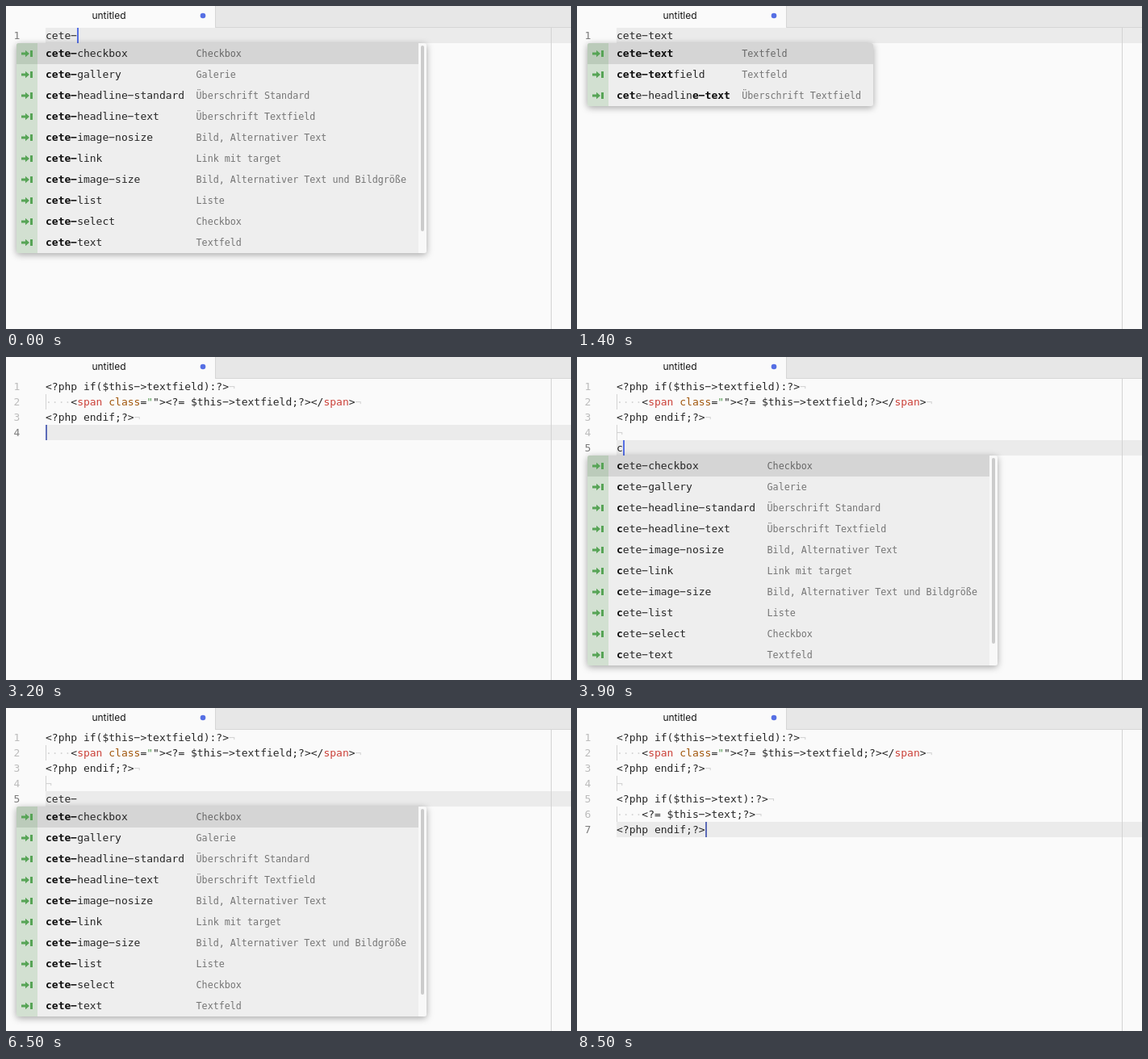
Recreate the animation shown at these times as an HTML page. Size 700x400 px, loop 8.7 s.

```html
<!DOCTYPE html>
<html lang="de">
<head>
<meta charset="utf-8">
<title>Snippet autocomplete</title>
<style>
  html, body { margin: 0; width: 100%; height: 100%; overflow: hidden; background: #fafafa; }
  svg { display: block; width: 100vw; height: 100vh; }
  text { white-space: pre; font: 13px "DejaVu Sans Mono", monospace; fill: #262626; }
  .title { font: 12px Inter, sans-serif; fill: #151515; text-anchor: middle; }
  .num { fill: #bcbcbc; }
  .num.on { fill: #7c7c7c; }
  .inv { fill: #d3d3d3; }
  .tag { fill: #cb4139; }
  .attr { fill: #a1570c; }
  .str { fill: #559a54; }
  .hit { font-weight: bold; fill: #0c0c0c; }
  .desc { font-size: 11.7px; fill: #757575; }
  .desc.on { fill: #686868; }
  .shadow { filter: drop-shadow(0 2px 4px rgba(0, 0, 0, .34)); }
</style>
</head>
<body>
<svg viewBox="0 0 700 400">
  <rect width="700" height="400" fill="#fafafa"/>
  <g id="lines"></g>
  <rect x="675" y="27" width="1" height="373" fill="#d3d3d3"/>
  <rect x="259" width="441" height="27" fill="#d6d6d6"/>
  <rect x="260" width="440" height="26" fill="#e7e7e7"/>
  <text class="title" x="127.5" y="16">untitled</text>
  <circle cx="244" cy="12" r="3.3" fill="#566fe4"/>
  <g id="popup"></g>
</svg>
<script>
const LOOP = 8700;
const LEFT = 49, TOP = 27, LINE_H = 19, CHAR_W = 7.826;
const ROW_H = 26, DESC_W = 7.044, BOX_X = 13;

// Popup entries: asterisks enclose the matched letters
const ALL = [
  ["checkbox", "Checkbox"],
  ["gallery", "Galerie"],
  ["headline-standard", "Überschrift Standard"],
  ["headline-text", "Überschrift Textfield"],
  ["image-nosize", "Bild, Alternativer Text"],
  ["link", "Link mit target"],
  ["image-size", "Bild, Alternativer Text und Bildgröße"],
  ["list", "Liste"],
  ["select", "Checkbox"],
  ["text", "Textfeld"]
];
const all = prefix => ALL.map(([name, desc]) => [prefix + name, desc]);
const some = (...names) => {
  const descs = ["Textfeld", "Textfeld", "Überschrift Textfield", "Content Element", "Module"];
  return names.map((name, i) => [name, descs[i]]);
};
const POPUPS = {
  "c": all("*c*ete-"),
  "ce": all("*ce*te-"),
  "ce-": all("*ce*te*-*"),
  "cet": all("*cet*e-"),
  "cete": all("*cete*-"),
  "cete-": all("*cete-*"),
  "cete-t": some("*cete-t*ext", "*cete-t*extfield", "*cete-*headline-*t*ext",
    "*cete-*s*t*andard-contentelement", "*cete-*s*t*andard-module"),
  "cete-te": some("*cete-te*xt", "*cete-te*xtfield", "*cete-*headline-*te*xt",
    "*cete-*standard-con*te*ntelement", "*cete-*s*t*andard-modul*e*"),
  "cete-tex": some("*cete-tex*t", "*cete-tex*tfield", "*cete-*headline-*tex*t"),
  "cete-text": some("*cete-text*", "*cete-text*field", "*cet*e-headlin*e-text*")
};

// Code lines: lists of [text, class]
const INDENT = ["····", "inv"];
const open = name => [[`<?php if($this->${name}):?>`]];
const close = [["<?php endif;?>"]];
const first = [
  open("textfield"),
  [INDENT, ["<"], ["span", "tag"], [" "], ["class", "attr"], ["="], ['"', "str"],
    ['"><?= $this->textfield;?></'], ["span", "tag"], [">"]],
  close
];
const second = [open("text"), [INDENT, ["<?= $this->text;?>"]], close];
const alone = word => [[[word]]];
const below = word => [...first, [], [[word]]];

// Each step: time, lines, popup, optional caret [row, column]
const STEPS = [
  [0, alone("cete-"), "cete-"],
  [100, alone("cete-t"), "cete-"],
  [200, alone("cete-t"), "cete-t"],
  [300, alone("cete-te"), "cete-t"],
  [400, alone("cete-te"), "cete-te"],
  [500, alone("cete-tex"), "cete-te"],
  [600, alone("cete-tex"), "cete-tex"],
  [700, alone("cete-text"), "cete-tex"],
  [800, alone("cete-text"), "cete-text"],
  [2000, first, "", [1, 17]],
  [2400, first, ""],
  [3200, [...first, []], ""],
  [3500, below(""), ""],
  [3800, below("c"), ""],
  [3900, below("c"), "c"],
  [4000, below("ce"), "c"],
  [4100, below("ce"), "ce"],
  [4500, below("ce-"), "ce"],
  [4600, below("ce-"), "ce-"],
  [5300, below("ce"), "ce"],
  [5500, below("cet"), "ce"],
  [5600, below("cete"), "cet"],
  [5700, below("cete-"), "cete"],
  [5800, below("cete-"), "cete-"],
  [6600, below("cete-t"), "cete-"],
  [6700, below("cete-te"), "cete-t"],
  [6800, below("cete-te"), "cete-te"],
  [8400, [...first, [], ...second], ""]
];
const CARET_OFF = [[1400, 1900], [5100, 5300], [6400, 6600], [7200, 7600], [8000, 8400]];

const byId = id => document.getElementById(id);
// Hyphens are drawn wide, as in the editor's face
const esc = s => s.replace(/&/g, "&amp;").replace(/</g, "&lt;").replace(/-/g, "−");
const span = (s, cls) => `<tspan class="${cls || ""}">${esc(s)}</tspan>`;
const rect = (x, y, w, h, fill, more = "") =>
  `<rect x="${x}" y="${y}" width="${w}" height="${h}" fill="${fill}" ${more}/>`;
const lineLength = line => line.reduce((n, [s]) => n + s.length, 0);

function drawLines(lines, caret, caretOn, hasPopup) {
  const last = lines.length - 1;
  const [row, col] = caret || [last, lineLength(lines[last])];
  let out = rect(LEFT, TOP + row * LINE_H, 700 - LEFT, LINE_H, "#ebebeb");
  lines.forEach((line, i) => {
    const y = TOP + i * LINE_H;
    const guide = line[0] === INDENT || (!line.length && i < last);
    if (guide) out += rect(LEFT, y, 1, LINE_H, "#d3d3d3");
    out += `<text class="num ${i === row ? "on" : ""}" x="9.5" y="${y + 14}">${i + 1}</text>`;
    const eol = i < last ? span("¬", "inv") : "";
    out += `<text x="${LEFT}" y="${y + 14}">${line.map(t => span(...t)).join("")}${eol}</text>`;
  });
  if (caretOn) {
    const x = Math.round(LEFT + col * CHAR_W);
    out += rect(x, TOP + row * LINE_H, 2, LINE_H, hasPopup ? "#566fe4" : "#5c6bb8");
  }
  return out;
}

function drawPopup(items, top) {
  if (!items) return "";
  const longest = (col, strip) =>
    Math.max(...items.map(item => item[col].replace(strip, "").length));
  const descX = LEFT + longest(0, /\*/g) * CHAR_W + 14.4;
  const inner = Math.round(descX + longest(1, "") * DESC_W + 14.6);
  const scrolls = items.length === ALL.length;
  const w = inner - BOX_X + (scrolls ? 10 : 0), h = items.length * ROW_H;
  let out = rect(BOX_X, top, w, h, "#eee", 'rx="3" class="shadow"');
  out += `<clipPath id="box">${rect(BOX_X, top, w, h, "#000", 'rx="3"')}</clipPath>`;
  out += '<g clip-path="url(#box)">';
  out += rect(BOX_X, top, inner - BOX_X, ROW_H, "#d5d5d5");
  out += rect(BOX_X, top, 26, h, "#d2e0d1") + rect(BOX_X, top, 26, ROW_H, "#bbcbba");
  if (scrolls) {
    out += rect(inner, top, 10, h, "#f8f8f8");
    out += rect(inner + 3, top + 3, 4, 230, "#cbcbcb", 'rx="2"');
  }
  items.forEach(([name, desc], i) => {
    const y = top + i * ROW_H;
    const label = name.split("*").map((s, k) => span(s, k % 2 ? "hit" : "")).join("");
    out += `<path transform="translate(19 ${y + 13})" fill="#57a456"
      d="M0-1.5H5V-4.3L10 0 5 4.3V1.5H0ZM11-4H14V4H11Z"/>
      <text x="${LEFT}" y="${y + 17}">${label}</text>
      <text class="desc ${i ? "" : "on"}" x="${descX}" y="${y + 17}">${esc(desc)}</text>`;
  });
  return out + "</g>";
}

let shown = "";
function render(t) {
  const index = STEPS.findLastIndex(step => step[0] <= t);
  const caretOn = !CARET_OFF.some(([a, b]) => t >= a && t < b);
  const key = index + "/" + caretOn;
  if (key === shown) return;
  shown = key;
  const [, lines, word, caret] = STEPS[index];
  byId("lines").innerHTML = drawLines(lines, caret, caretOn, !!word);
  byId("popup").innerHTML = drawPopup(POPUPS[word], TOP + lines.length * LINE_H);
}

const start = performance.now();
function tick() {
  render((performance.now() - start) % LOOP);
  requestAnimationFrame(tick);
}
tick();
</script>
</body>
</html>
```
